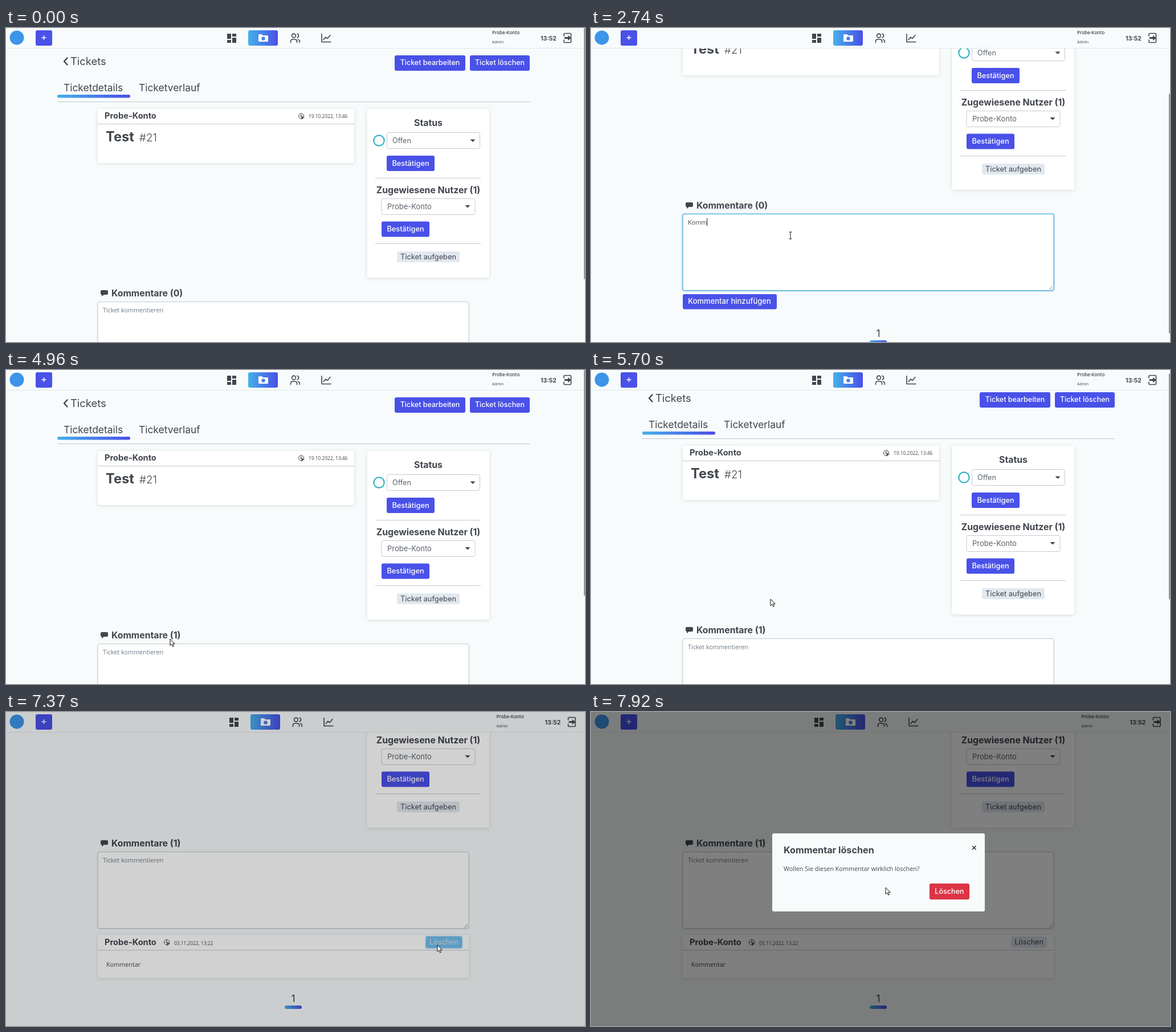
Recreate the animation shown at these times as an HTML page. Size 1016 by 551 pixels, loop 7990 ms.

```html
<!DOCTYPE html>
<html lang="de">
<head>
<meta charset="utf-8">
<title>Ticket kommentieren</title>
<style>
  html, body { margin: 0; height: 100%; overflow: hidden; background: #f7fbfc; }
  svg { display: block; width: 1016px; height: 551px; font-family: Inter, sans-serif; }
  text { fill: #41464e; white-space: pre; }
  .bold { font-weight: 700; }
  .mid { text-anchor: middle; }
  .white { fill: #fff; font-weight: 500; text-anchor: middle; }
  .body { font-family: "Open Sans", sans-serif; font-size: 10.8px; }
  .date { font-family: "Open Sans", sans-serif; font-size: 8.4px; }
  .h { font-size: 15.8px; font-weight: 700; }
  .choice { fill: #5c636c; }
  .btn { fill: #4951e8; }
  .card { fill: #fff; filter: drop-shadow(0 1px 3px #0000001f); }
  .field { fill: #fff; stroke: #c6cbd1; }
  .rule { stroke: #c2c7cd; }
  .icon { fill: none; stroke: #41464e; stroke-width: 1.6; stroke-linecap: round; stroke-linejoin: round; }
  .dark { fill: #41464e; }
  .pointer path { fill: #fff; stroke: #111; stroke-linejoin: round; }
</style>
</head>
<body>
<svg viewBox="0 0 1016 551">
  <defs>
    <linearGradient id="blue"><stop stop-color="#45b1ea"/><stop offset="1" stop-color="#4a4ee8"/></linearGradient>
    <g id="clockIcon">
      <circle r="4.6" class="icon" style="stroke-width:1"/>
      <path d="M0-3V0H-2" class="icon" style="stroke-width:1"/>
      <path d="M0-.5 6 3 3 3.8 1 6.4Z" class="dark"/>
    </g>
    <path id="caretDown" d="M-4.5-2h9L0 2.5Z" class="dark"/>
  </defs>

  <g id="page">
    <path d="M107.500 52.500 102 58.500 107.500 64.500" class="icon" style="stroke-width:2.4"/>
    <text x="113" y="64.500" font-size="18.4">Tickets</text>
    <rect x="682" y="48" width="124" height="27" rx="3" class="btn"/>
    <text x="744" y="65" class="white" font-size="12.5">Ticket bearbeiten</text>
    <rect x="814" y="48" width="105" height="27" rx="3" class="btn"/>
    <text x="866.500" y="65" class="white" font-size="12.5">Ticket löschen</text>
    <text x="101" y="110.500" font-size="17.4">Ticketdetails</text>
    <text x="233" y="110.500" font-size="17.4">Ticketverlauf</text>
    <rect x="90" y="117" width="128" height="5.500" rx="2.700" fill="url(#blue)"/>
    <path d="M90 129.500H919" class="rule"/>

    <rect x="161" y="142" width="450" height="95" rx="3" class="card"/>
    <text x="173" y="159" class="bold" font-size="14.6">Probe-Konto</text>
    <use href="#clockIcon" x="518" y="154.500"/>
    <text x="531" y="158" class="date">19.10.2022, 13:46</text>
    <path d="M161 168.500H611" class="rule"/>
    <text x="175" y="199" class="bold" font-size="23.6">Test</text>
    <text x="234" y="199" font-size="18.8" font-weight="300">#21</text>

    <rect x="633.500" y="142" width="214.500" height="296" rx="3" class="card"/>
    <text x="741" y="171.500" class="h mid">Status</text>
    <circle cx="654.500" cy="197.500" r="9.200" fill="none" stroke="#30b3c0" stroke-width="2.200"/>
    <rect x="668.500" y="183.500" width="163" height="28" rx="3" class="field"/>
    <text x="678" y="202" class="choice" font-size="12.6">Offen</text>
    <use href="#caretDown" x="819" y="197.500"/>
    <rect x="668" y="224" width="84" height="27" rx="3" class="btn"/>
    <text x="710" y="241.500" class="white" font-size="12.8">Bestätigen</text>
    <path d="M648 263.500H833" class="rule"/>
    <text x="741" y="290" class="h mid">Zugewiesene Nutzer (1)</text>
    <rect x="659" y="299.500" width="164" height="28" rx="3" class="field"/>
    <text x="669" y="317.500" class="choice" font-size="13">Probe-Konto</text>
    <use href="#caretDown" x="810" y="313"/>
    <rect x="659" y="339.500" width="84" height="27" rx="3" class="btn"/>
    <text x="701" y="357" class="white" font-size="12.8">Bestätigen</text>
    <path d="M648 378.500H833" class="rule"/>
    <rect x="686" y="392" width="110" height="19" rx="3" fill="#e2e8f0"/>
    <text x="741" y="406" class="mid" font-size="12.8">Ticket aufgeben</text>

    <path d="M168 460h9q2 0 2 2v4q0 2-2 2h-5l-4 3v-3q-2 0-2-2v-4q0-2 2-2Z" class="dark"/>
    <text id="heading" x="185" y="470.500" class="h"></text>
    <rect id="glow" x="161" y="480.500" width="651" height="134" rx="3" fill="none" stroke="#46b4ea" stroke-width="4" opacity="0"/>
    <rect x="161" y="480.500" width="651" height="134" rx="3" class="field" style="filter:drop-shadow(0 1px 1px #0002)"/>
    <rect id="focusLine" x="161" y="480.500" width="651" height="134" rx="3" fill="none" stroke="#46b4ea"/>
    <path d="M804 613 810 607M808 613 810 611" stroke="#666" stroke-width=".8"/>
    <text id="entry" x="170" y="499" class="body"></text>
    <path id="caret" d="M0 487.500V501.500" stroke="#222"/>

    <g id="addButton">
      <rect x="161" y="621" width="165" height="26.500" rx="3" class="btn"/>
      <rect id="sweep" x="161" y="621" height="26.500" rx="2" fill="#46b4ea"/>
      <text x="243" y="638" class="white" font-size="13">Kommentar hinzufügen</text>
    </g>

    <g id="comment">
      <rect x="161" y="626" width="651" height="75.500" rx="3" class="card"/>
      <text x="173" y="644" class="bold" font-size="14.6">Probe-Konto</text>
      <use href="#clockIcon" x="282" y="639"/>
      <text x="295" y="643.500" class="date">03.11.2022, 13:22</text>
      <path d="M161 653H812" class="rule"/>
      <text x="176" y="682" class="body">Kommentar</text>
      <rect id="deleteGlow" x="735.500" y="627.500" width="66" height="23" rx="4" fill="#b5dcf8"/>
      <rect x="737" y="629" width="63" height="20" rx="3" fill="#e2e8f0"/>
      <rect id="deleteTint" x="737" y="629" width="63" height="20" rx="3" fill="#6fbdf0"/>
      <text id="deleteLabel" x="768.500" y="643" class="mid" font-size="12.6">Löschen</text>
    </g>

    <g id="pager">
      <text x="504" y="662.500" class="mid" font-size="17.500">1</text>
      <rect x="489" y="669" width="30" height="6" rx="3" fill="url(#blue)"/>
    </g>
  </g>

  <rect width="1016" height="36" fill="#f8fbfc"/>
  <path d="M0 35.500H1016" stroke="#e1e6ea"/>
  <circle cx="19" cy="17" r="12.500" fill="#3c95e8"/>
  <rect x="52" y="4" width="29" height="27" rx="3" class="btn"/>
  <path d="M62.500 17H70.500M66.500 13V21" stroke="#fff" stroke-width="1.500"/>
  <g id="nav">
    <path d="M388 10h7v9h-7ZM397 10h7v5h-7ZM388 21h7v5h-7ZM397 17h7v9h-7Z" class="dark"/>
    <rect x="425" y="4" width="52" height="27" rx="3" fill="url(#blue)"/>
    <path d="M444 11h5l2 2h8q1 0 1 1v9q0 1-1 1h-15q-1 0-1-1v-11q0-1 1-1Z" fill="#fff"/>
    <circle cx="451.500" cy="18.500" r="3.200" fill="#4880e8"/>
    <g class="icon">
      <circle cx="505" cy="13.500" r="3.400"/>
      <path d="M499.500 25.500v-2q0-3.500 3.500-3.500h4q3.500 0 3.500 3.500v2M511 10.200a3.400 3.400 0 0 1 0 6.600M512.500 20.200q2.800.8 2.800 3.500v1.800"/>
      <path d="M554 10.500V24.500H570M557 20.500 561 16 564 18.500 569 12.500"/>
    </g>
  </g>
  <g id="account">
    <text x="853" y="10.500" class="date" style="font-weight:600;font-size:8px">Probe-Konto</text>
    <text x="853" y="26.500" class="date" style="font-size:6.6px">Admin</text>
    <text x="938" y="21.500" class="bold" font-size="10.5">13:52</text>
    <path d="M979 14v-3q0-1.500 1.500-1.500h9.500q1.500 0 1.500 1.500v13q0 1.500-1.500 1.500h-9.500q-1.500 0-1.500-1.500v-3" class="icon"/>
    <path d="M980 16h6v-3l6 4.500-6 4.500v-3h-6Z" class="dark"/>
  </g>
  <rect id="scrollbar" x="1014" width="2" rx="1" fill="#8f9499"/>

  <rect id="shade" width="1016" height="551"/>
  <g id="modal">
    <rect x="318" y="213" width="373" height="137" rx="3" fill="#f7fbfc"/>
    <text x="338" y="247.500" class="bold" font-size="16.2">Kommentar löschen</text>
    <path d="M669 235 675.500 241.500M675.500 235 669 241.500" stroke="#333" stroke-width="1.700"/>
    <text x="338" y="278.500" class="body">Wollen Sie diesen Kommentar wirklich löschen?</text>
    <rect x="594" y="301" width="70" height="28" rx="3" fill="#dc3545"/>
    <text x="629" y="319" class="white" font-size="12.6">Löschen</text>
  </g>

  <g id="pointer" class="pointer">
    <circle id="press" r="9" fill="#f9f36a"/>
    <path id="arrow" d="M0 0V11.500L2.700 9 4.600 13.300 6.500 12.400 4.600 8.300H8.200Z"/>
    <path id="beam" d="M-2.500-6H2.500M0-6V6M-2.500 6H2.500"/>
    <path id="hand" d="M-1.400 9V1q0-1.300 1.400-1.300t1.400 1.300V6q1.500-.8 2.400.4 1.500-.5 2.200.8 2-.2 2 1.700v3.600q0 2-1.500 4.500h-6.500q-1.500-3-4.400-6.500-.5-1.800 1-1.900Z"/>
  </g>
</svg>
<script>
const LOOP = 7990, WORD = 'Kommentar';
const FOCUS = 1250, BLUR = 4600, POSTED = 4900, MODAL = 7320;
const keyTimes = [2220, 2410, 2610, 2740, 2880, 2940, 3080, 3280, 3410];
const $ = Object.fromEntries([...document.querySelectorAll('svg [id]')].map(e => [e.id, e]));

const progress = (t, from, to) => Math.min(1, Math.max(0, (t - from) / (to - from)));
const smooth = u => u * u * (3 - 2 * u);
const ease = (t, from, to) => smooth(progress(t, from, to));
const within = (t, from, to) => t >= from && t < to;
const set = (el, attrs) => { for (const k in attrs) el.setAttribute(k, attrs[k]); };
const show = (el, on) => set(el, { opacity: +on });
const move = (el, x, y) => set(el, { transform: `translate(${x} ${y})` });

// Eased position on a path of [time, x, y] stops.
function along(t, stops) {
  const next = stops.findIndex(s => s[0] > t);
  if (next < 1) return (next ? stops.at(-1) : stops[0]).slice(1);
  const a = stops[next - 1], b = stops[next], u = ease(t, a[0], b[0]);
  return [a[1] + (b[1] - a[1]) * u, a[2] + (b[2] - a[2]) * u];
}

const pointerPath = [
  [70, 520, 566], [400, 350, 364], [3880, 350, 364], [4200, 288, 472],
  [5370, 288, 472], [5620, 315, 402], [6040, 315, 402], [6250, 252, 433],
  [6450, 252, 433], [6880, 754, 413], [7050, 757, 409], [7400, 757, 409], [7880, 517, 308]
];

function drawEditor(t, posted) {
  const typed = posted ? 0 : keyTimes.filter(k => k <= t).length;
  $.entry.textContent = typed ? WORD.slice(0, typed) : 'Ticket kommentieren';
  $.entry.style.fill = typed ? '#41464e' : '#6c7a86';
  const focus = ease(t, FOCUS, 1500) * (1 - ease(t, BLUR, 4700));
  set($.focusLine, { opacity: focus });
  set($.glow, { opacity: focus * .3 });
  const lastKey = typed ? keyTimes[typed - 1] : FOCUS;
  show($.caret, within(t, FOCUS, BLUR) && Math.floor((t - lastKey) / 530) % 2 === 0);
  move($.caret, 170.5 + (typed ? $.entry.getComputedTextLength() : 0), 0);
}

function drawPointer(t) {
  move($.pointer, ...along(t, pointerPath));
  const beam = within(t, 800, 4080);
  const hand = within(t, 4150, POSTED) || within(t, 6800, MODAL);
  show($.beam, beam);
  show($.hand, hand);
  show($.arrow, !beam && !hand);
  show($.press, within(t, 1210, 1480) || within(t, 4560, 4680) || within(t, 7180, 7300));
}

function draw(t) {
  const posted = t >= POSTED, modal = t >= MODAL;
  const reveal = ease(t, 1480, 1800);
  const push = posted ? 81 : 33 * reveal;
  const scroll = Math.round(posted ? 235 * ease(t, 5645, 6110) : 154 * ease(t, 350, 1000));
  move($.page, 0, -scroll);
  move($.pager, 0, push);

  const ratio = 551 / (705 + push);
  set($.scrollbar, { y: scroll * ratio, height: 551 * ratio + 10, opacity: +!modal });

  $.heading.textContent = `Kommentare (${+posted})`;
  drawEditor(t, posted);
  set($.addButton, { opacity: posted ? 0 : reveal });
  set($.sweep, { width: 165 * ease(t, 4110, 4480) });

  show($.comment, posted);
  const tint = ease(t, 6770, 7150) * (1 - ease(t, 7330, 7700));
  set($.deleteTint, { opacity: tint });
  set($.deleteGlow, { opacity: ease(t, 7180, 7300) * tint });
  $.deleteLabel.style.fill = `color-mix(in srgb, #e2e8f0 ${tint * 100}%, #41464e)`;

  move($.nav, modal ? 4 : 0, 0);
  move($.account, modal ? 7.5 : 0, 0);
  set($.shade, { opacity: .5 * progress(t, MODAL, MODAL + 140) });
  const drop = ease(t, 7470, 7770);
  set($.modal, { opacity: drop });
  move($.modal, 0, -50 * (1 - drop));
  drawPointer(t);
}

const start = performance.now();
function tick() {
  draw((performance.now() - start) % LOOP);
  requestAnimationFrame(tick);
}
tick();
</script>
</body>
</html>
```
